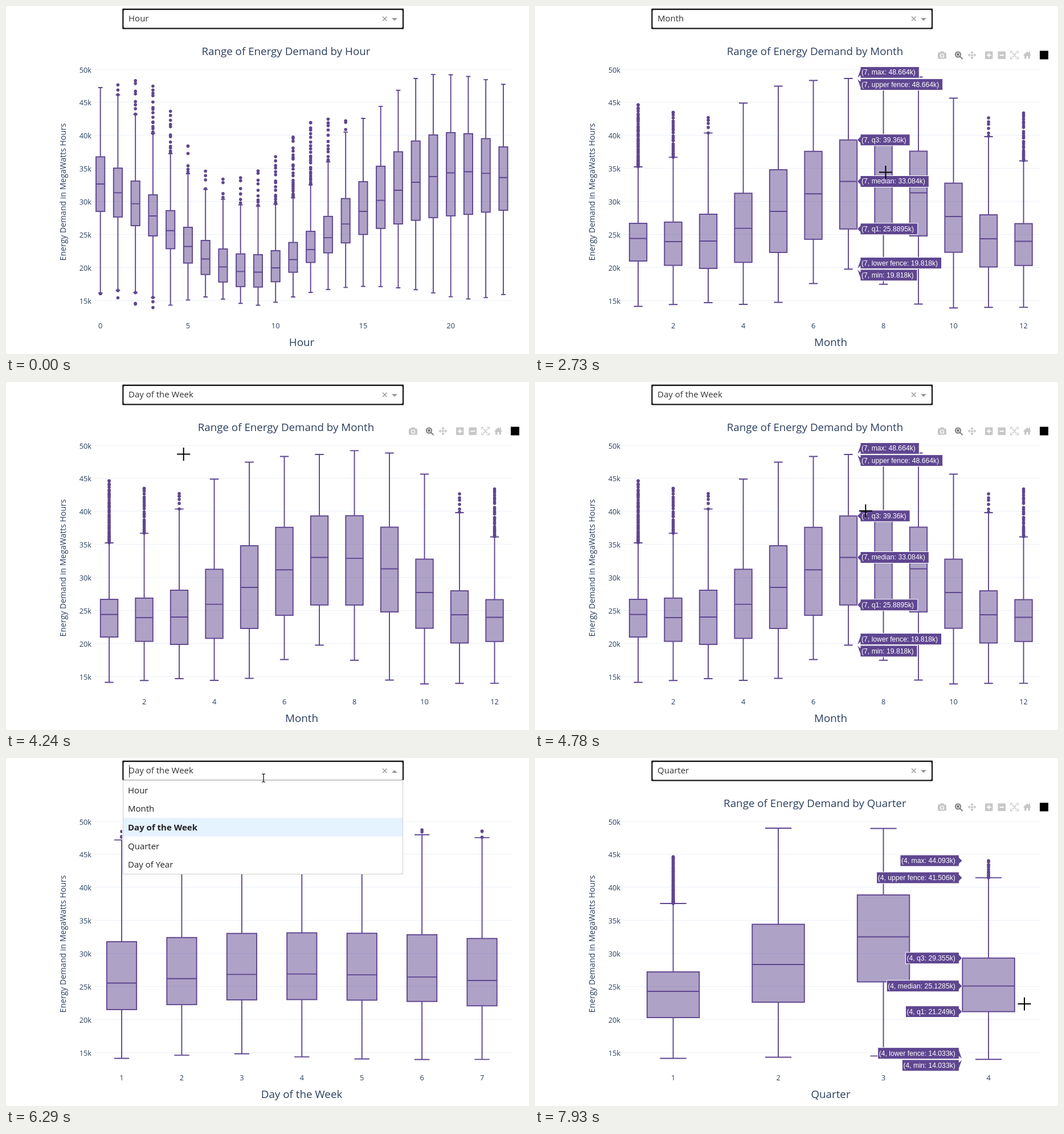
Animation, 918 px wide and 610 px high, one loop 8000 ms. Source, as an HTML page with a canvas:

```html
<!DOCTYPE html>
<html lang="en">
<head>
<meta charset="utf-8">
<title>Range of Energy Demand</title>
<style>
  html, body { margin: 0; width: 918px; height: 610px; overflow: hidden; background: #fff; }
  canvas { display: block; }
</style>
</head>
<body>
<canvas id="stage" width="918" height="610"></canvas>
<script>
const LOOP = 8000, LEFT = 150.3, WIDTH = 738, HOVER_LAG = 150;
const PURPLE = '#5f4690', INK = '#2a3f5f';
const SANS = '"Open Sans", sans-serif', ARIAL = '"Liberation Sans", Arial, sans-serif';
const ctx = document.getElementById('stage').getContext('2d');

const yOf = v => 111.5 + (50 - v) * 11.586;
const noise = seed => Math.abs(Math.sin(seed * 12.9898) * 43758.5453) % 1;

// Smooth closed curve through evenly spaced knots, u from 0 to 1.
function spline(knots, u) {
  const n = knots.length, i = Math.floor(u * n), f = u * n - i;
  const [a, b, c, d] = [-1, 0, 1, 2].map(k => knots[(i + k + n) % n]);
  return b + f * (c - a + f * (2 * a - 5 * b + 4 * c - d + f * (3 * (b - c) + d - a))) / 2;
}

// Outliers between a fence and the extreme, denser near the fence.
function outliers(fence, extreme, count, seed) {
  const gap = extreme - fence;
  if (Math.abs(gap) < 0.01) return [];
  const n = Math.round(6 * gap * gap / count) + 1;
  const inner = Array.from({ length: n }, (_, k) => fence + gap * ((k + noise(seed * 50 + k + 1)) / n) ** 1.4);
  return [...inner, extreme];
}

// Knots run through one cycle; fences follow the 1.5 IQR rule.
function makeChart(name, first, count, tickStep, knots) {
  const boxes = Array.from({ length: count }, (_, i) => {
    const [min, q1, median, q3, max] = knots.map(row => spline(row, i / count));
    const reach = 1.499 * (q3 - q1);
    const low = Math.max(min, q1 - reach), high = Math.min(max, q3 + reach);
    const dots = [...outliers(low, min, count, i), ...outliers(high, max, count, i)];
    return { n: i + first, min, low, q1, median, q3, high, max, dots };
  });
  const unit = WIDTH / count;
  return { name, boxes, unit, tickStep, xOf: n => LEFT + (n - first + 0.5) * unit };
}

const charts = [
  makeChart('Hour', 0, 24, 5, [
    [16.1, 14, 15.6, 14.35, 16.3, 17.2, 16.7, 15.3],
    [28.55, 24.84, 19, 17.1, 20.83, 25.06, 27.2, 28.1],
    [32.7, 27.86, 21.34, 19.36, 22.77, 28.55, 32.95, 34.55],
    [36.8, 31.05, 24.15, 22, 25.53, 33.04, 39.2, 40.3],
    [47.28, 47.5, 34.64, 34.68, 42, 42.62, 48.66, 48.96]
  ]),
  makeChart('Month', 1, 12, 2, [
    [14.18, 14.74, 14.78, 19.818, 14.53, 14.033],
    [21.04, 19.92, 22.34, 25.8895, 24.84, 20.14],
    [24.45, 24.06, 28.55, 33.084, 31.36, 24.41],
    [26.74, 28.12, 34.85, 39.36, 37.66, 28.03],
    [44.69, 42.75, 47.5, 48.664, 48.88, 42.7]
  ]),
  makeChart('Day of the Week', 1, 7, 1, [
    [14.18, 14.9, 14.2, 14],
    [21.56, 22.95, 23.03, 22.7],
    [25.57, 26.8, 26.9, 26.4],
    [31.83, 33, 33.15, 32.8],
    [48.5, 48.8, 49, 48.7]
  ]),
  makeChart('Quarter', 1, 4, 1, [
    [14.18, 14.353, 14.534, 14.033],
    [20.35, 22.684, 25.752, 21.249],
    [24.32, 28.381, 32.563, 25.1285],
    [27.26, 34.462, 38.902, 29.355],
    [44.69, 49.008, 48.962, 44.093]
  ])
];
const OPTIONS = ['Hour', 'Month', 'Day of the Week', 'Quarter', 'Day of Year'];

// Every menu picks the next option; the chart follows once it has loaded.
const menus = [[1210, 1820], [3800, 4240], [6290, 7020]];
const reloads = [2640, 5050, 7490];
const pointerPath = [
  [0, 655, -30], [650, 655, -30], [760, 560, 14], [1040, 290, 30], [1210, 276, 34], [1380, 278, 91],
  [1820, 282, 93], [2710, 615.5, 291.5], [2800, 615.5, 291.5], [3080, 540, 180], [3530, 404, 30],
  [3620, 404, 22], [3800, 404, 24], [4060, 310, 122], [4240, 310, 126], [4330, 462, 165], [4780, 580, 226],
  [5220, 728, 262], [5410, 728, 262], [5950, 345, 190], [6200, 450, 38], [6290, 452, 35], [6580, 452, 35],
  [6850, 288, 155], [7020, 288, 155], [7380, 345, 230], [7750, 740, 390], [7920, 859, 431], [LOOP, 859, 431]
];

function pointerAt(t) {
  const i = pointerPath.findIndex(([time]) => time > t);
  const [t0, x0, y0] = pointerPath[i - 1], [t1, x1, y1] = pointerPath[i];
  const k = (t - t0) / (t1 - t0);
  return [x0 + (x1 - x0) * k, y0 + (y1 - y0) * k];
}

function stateAt(t) {
  const [x, y] = pointerAt(t);
  return {
    x, y,
    open: menus.some(([from, to]) => t >= from && t < to),
    value: menus.filter(([, to]) => t >= to).length,
    chart: charts[reloads.filter(time => t >= time).length]
  };
}

function text(str, x, y, font, color = INK, align = 'left') {
  ctx.font = font;
  ctx.fillStyle = color;
  ctx.textAlign = align;
  ctx.fillText(str, x, y);
}

function lines(color, width, ...segments) {
  ctx.strokeStyle = color;
  ctx.lineWidth = width;
  ctx.beginPath();
  for (const [x0, y0, x1, y1] of segments) { ctx.moveTo(x0, y0); ctx.lineTo(x1, y1); }
  ctx.stroke();
}

function dot(x, y, r, color) {
  ctx.fillStyle = color;
  ctx.beginPath();
  ctx.arc(x, y, r, 0, 7);
  ctx.fill();
}

function rect(x, y, w, h, color, r = 0) {
  ctx.fillStyle = color;
  ctx.beginPath();
  ctx.roundRect(x, y, w, h, r);
  ctx.fill();
}

function shape(d, x, y, fill, stroke) {
  const path = new Path2D(d);
  ctx.save();
  ctx.translate(x, y);
  if (fill) { ctx.fillStyle = fill; ctx.fill(path); }
  if (stroke) { ctx.strokeStyle = stroke; ctx.stroke(path); }
  ctx.restore();
}

function drawChart({ name, boxes, unit, tickStep, xOf }) {
  for (let v = 15; v <= 50; v += 5) {
    const y = Math.round(yOf(v)) - 0.5;
    lines('#ebf0f8', 1, [LEFT + 3, y, LEFT + WIDTH, y]);
    text(v + 'k', 150, y + 5, `12.8px ${SANS}`, INK, 'right');
  }
  const half = unit * 0.248, cap = unit / 8;
  for (const box of boxes) {
    const x = xOf(box.n);
    const [yl, y1, ym, y3, yh] = [box.low, box.q1, box.median, box.q3, box.high].map(yOf);
    ctx.fillStyle = PURPLE + '80';
    ctx.fillRect(x - half, y3, half * 2, y1 - y3);
    lines(PURPLE, 1.9, [x, yl, x, y1], [x, y3, x, yh], [x - cap, yl, x + cap, yl],
      [x - cap, yh, x + cap, yh], [x - half, ym, x + half, ym]);
    ctx.strokeRect(x - half, y3, half * 2, y1 - y3);
    for (const v of box.dots) dot(x, yOf(v), 2.8, PURPLE);
    if (box.n % tickStep === 0) text(box.n, x, 564.5, `12.8px ${SANS}`, INK, 'center');
  }
  text('Range of Energy Demand by ' + name, 491.4, 86, `18.75px ${SANS}`, INK, 'center');
  text(name, 519, 596, `18.8px ${SANS}`, INK, 'center');
  ctx.save();
  ctx.translate(105, 326);
  ctx.rotate(-Math.PI / 2);
  text('Energy Demand in MegaWatts Hours', 0, 0, `14.05px ${SANS}`, INK, 'center');
  ctx.restore();
}

function drawHover({ boxes, unit, xOf }, pointerX) {
  const box = boxes[Math.min(boxes.length - 1, Math.floor((pointerX - LEFT) / unit))];
  const rows = { max: box.max, 'upper fence': box.high, q3: box.q3, median: box.median, q1: box.q1,
    'lower fence': box.low, min: box.min };
  const labels = Object.entries(rows).map(([name, v]) =>
    ({ str: `(${box.n}, ${name}: ${Math.round(v * 2000) / 2000}k)`, tip: yOf(v), y: yOf(v) }));
  // Push close neighbours apart.
  labels.forEach((a, i) => {
    const b = labels[i + 1];
    if (b && b.tip - a.tip < 21.2) {
      const mid = (a.tip + b.tip) / 2;
      a.y = mid - 10.6;
      b.y = mid + 10.6;
    }
  });
  const x = xOf(box.n), side = x + unit / 4 + 150 > 918 ? -1 : 1;
  const tipX = x + side * unit / 4, edge = tipX + side * 5.6;
  for (const { str, tip, y } of labels) {
    ctx.font = `12.2px ${ARIAL}`;
    const far = edge + side * (ctx.measureText(str).width + 8.5);
    ctx.beginPath();
    [[tipX, tip], [edge, y - 5.5], [edge, y - 10], [far, y - 10], [far, y + 10], [edge, y + 10], [edge, y + 5.5]]
      .forEach(p => ctx.lineTo(...p));
    ctx.closePath();
    ctx.fillStyle = PURPLE;
    ctx.fill();
    ctx.strokeStyle = '#fff';
    ctx.lineWidth = 1;
    ctx.stroke();
    text(str, Math.min(edge, far) + 2, y + 4, `12.2px ${ARIAL}`, '#fff');
  }
}

function drawToolbar() {
  const grey = '#c7c7c7', dark = '#7c7c7c';
  rect(707, 81.5, 15, 11, grey, 2);
  rect(711, 79.5, 7, 4, grey, 1);
  dot(714.5, 87, 3.6, '#fff');
  dot(714.5, 87, 2.2, grey);

  ctx.lineWidth = 2;
  shape('M4.6 0A4.6 4.6 0 1 1-4.6 0A4.6 4.6 0 1 1 4.6 0M3.5 3.5L8 8', 742.5, 85, null, dark);
  rect(740.3, 82.8, 4.4, 4.4, dark);

  ctx.lineWidth = 1.6;
  shape('M-6 0H6M0-6V6', 767, 86, null, grey);
  shape('M0-7.5L3-4H-3ZM0 7.5L3 4H-3ZM-7.5 0L-4-3V3ZM7.5 0L4-3V3Z', 767, 86, grey);

  rect(790, 79.5, 13.5, 13.5, grey, 1);
  rect(812.5, 79.5, 13.5, 13.5, grey, 1);
  lines('#fff', 2, [793, 86.2, 800.5, 86.2], [796.7, 82.5, 796.7, 90], [815.5, 86.2, 823, 86.2]);

  ctx.lineWidth = 1.5;
  shape('M-3-6.5H-6.5V-3M3-6.5H6.5V-3M-3 6.5H-6.5V3M3 6.5H6.5V3M-4-4L4 4M4-4L-4 4', 841.5, 86, null, grey);
  shape('M-7.5 .5L0-6.5L3-3.7V-6H5V-1.8L7.5 .5H5V6.5H1.5V2H-1.5V6.5H-5V.5Z', 864, 86, grey);
  rect(886, 78.5, 15, 15, '#000');
}

function drawDropdown({ value, open, y: pointerY }) {
  rect(204.2, 4.6, 494, 36, '#1a1a1a', 1);
  rect(206.5, 7, 489.4, 31.2, '#fff', 2);
  text(OPTIONS[value], 215, 27, `15px ${SANS}`, '#333');
  lines('#999', 1.4, [661, 18.5, 668.5, 26], [668.5, 18.5, 661, 26]);
  shape(open ? 'M-5 2.5H5L0-2.5Z' : 'M-5-2.5H5L0 2.5Z', 682, 23.5, '#999');
  if (!open) return;

  rect(204, 38.5, 495, 165, '#fff');
  ctx.strokeStyle = '#ccc';
  ctx.lineWidth = 1;
  ctx.strokeRect(205.5, 39.5, 491, 164);
  lines('#e6e6e6', 1, [206, 39.5, 696, 39.5]);
  const focused = pointerY > 40 ? Math.floor((pointerY - 39.5) / 32.7) : value;
  OPTIONS.forEach((name, i) => {
    const y = 39.5 + i * 32.7;
    if (i === focused) rect(206, y, 490, 32.7, '#e5f2ff');
    text(name, 214, y + 22, `${i === value ? 'bold ' : ''}15px ${SANS}`, '#222');
  });
  lines('#333', 1, [216.5, 12, 216.5, 34]);
}

function drawPointer({ x, y, open }) {
  ctx.lineWidth = 1.2;
  if (y < 42) {
    shape('M-3-7H-1L0-6L1-7H3M0-6V6M-3 7H-1L0 6L1 7H3', x, y, null, '#000');
  } else if (open) {
    shape('M-4.5 2.5V-8.2a1.9 1.9 0 0 1 3.8 0V-2a1.7 1.7 0 0 1 3.2 0a1.7 1.7 0 0 1 3.2 .6a1.6 1.6 0 0 1 3 .8' +
      'V4.5C8.7 7 7.5 8 7 10H-2.5C-3 8-6 4.5-7.8 2C-8.6 .6-6.5-.6-4.5 2.5Z', x, y, '#fff', '#000');
  } else if (y > 99) {
    lines('#000', 2, [x - 11.5, y, x + 11.5, y], [x, y - 11.5, x, y + 11.5]);
  } else {
    shape('M0 0V16L3.7 12.5L6 18L8.5 17L6.2 11.6H11Z', x, y, '#fff', '#000');
  }
}

function render() {
  const t = performance.now() % LOOP;
  const now = stateAt(t), past = stateAt(Math.max(0, t - HOVER_LAG));
  const loaded = now.chart !== charts[0];
  ctx.fillStyle = '#fff';
  ctx.fillRect(0, 0, 918, 610);
  drawChart(now.chart);
  if (!now.open && now.y > 40) drawToolbar();
  if (loaded && !now.open && !past.open && now.y > 99 && past.y > 99) drawHover(now.chart, past.x);
  drawDropdown(now);
  drawPointer(now);
  requestAnimationFrame(render);
}
render();
</script>
</body>
</html>
```
